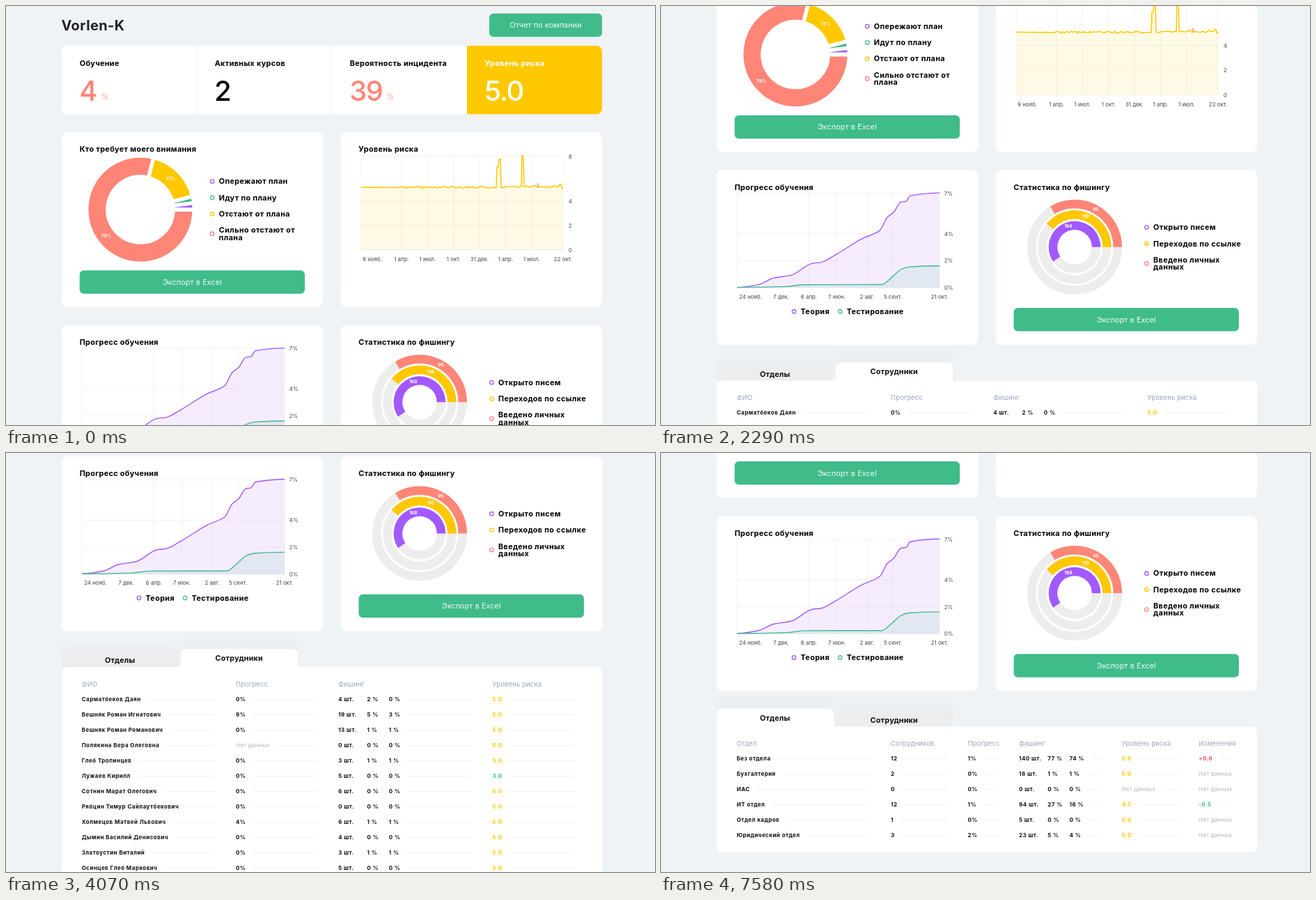
An HTML page that plays this animation: 932 by 601 pixels, repeating every 8 s.

```html
<!DOCTYPE html>
<html lang="ru">
<head>
<meta charset="utf-8">
<title>Отчет</title>
<style>
html, body { margin: 0; width: 100%; height: 100%; overflow: hidden; background: #eff3f6; }
svg { display: block; width: 932px; height: 601px; font-family: Inter, "Open Sans", sans-serif; }
.tab { filter: drop-shadow(0 -15px 3px rgba(110, 90, 70, .022)); }
</style>
</head>
<body>
<svg id="stage" viewBox="0 0 932 601"></svg>
<script>
const GREEN = '#40bb8a', YELLOW = '#ffc800', RED = '#ff8577', PURPLE = '#a259ff';
const GRID = 'rgba(40, 40, 80, .06)', MUTED = '#9ba5ba';
const stage = document.getElementById('stage');

function add(parent, tag, attrs = {}) {
  const el = document.createElementNS('http://www.w3.org/2000/svg', tag);
  for (const k in attrs) el.setAttribute(k, attrs[k]);
  parent.appendChild(el);
  return el;
}
const group = (parent) => add(parent, 'g');
const rect = (g, x, y, x2, y2, fill, r = 0) =>
  add(g, 'rect', { x, y, width: x2 - x, height: y2 - y, rx: r, fill });
const path = (g, d, fill, stroke = 'none', width = 1) =>
  add(g, 'path', { d, fill, stroke, 'stroke-width': width, 'stroke-linejoin': 'round' });
const line = (g, x, y, x2, y2, stroke = GRID, width = 1) => path(g, `M${x} ${y}L${x2} ${y2}`, 'none', stroke, width);

// y is the optical middle of the text
function text(g, str, x, y, size, { weight = 400, fill = '#000', anchor = 'start', spacing = 0 } = {}) {
  const el = add(g, 'text', {
    x, y: y + size * 0.35, 'font-size': size, 'font-weight': weight,
    fill, 'text-anchor': anchor, 'letter-spacing': spacing
  });
  el.textContent = str;
  return el;
}
const heading = (g, str, x, y, fill) => text(g, str, x, y, 10.9, { weight: 700, fill, spacing: 0.3 });
const small = (g, str, x, y, anchor = 'middle') => text(g, str, x, y, 7.9, { fill: '#444', anchor });
const badge = (g, str, x, y) => text(g, str, x, y, 6.6, { weight: 700, fill: '#fff', anchor: 'middle' });

function button(g, str, x, y, width) {
  rect(g, x, y, x + width, y + 33.5, GREEN, 6);
  text(g, str, x + width / 2, y + 16.9, 10.8, { fill: '#f1fbf6', anchor: 'middle', spacing: 0.1 });
}
function card(g, title, x, y) {
  rect(g, x, y, x + 375.2, y + 250.7, '#fff', 8);
  heading(g, title, x + 25.7, y + 24.3);
}
function legend(g, color, x, y, label) {
  const rows = label.split('\n');
  const mid = y + (rows.length - 1) * 5.2;
  add(g, 'circle', { cx: x, cy: mid, r: 2.7, fill: '#fff', stroke: color, 'stroke-width': 1.3 });
  rows.forEach((s, i) => text(g, s, x + 9.6, y + i * 10.4, 10.8, { weight: 700, spacing: 0.38 }));
}
const legendList = (g, x, y, items) =>
  items.forEach(([color, label], i) => legend(g, color, x, y + i * 23.3, label));

function polar(cx, cy, r, deg) {
  const a = deg * Math.PI / 180;
  return `${cx + r * Math.cos(a)} ${cy - r * Math.sin(a)}`;
}
// counter-clockwise arc, angles measured from the right
function arc(g, cx, cy, r, from, to, color, width) {
  path(g, `M${polar(cx, cy, r, from)}A${r} ${r} 0 ${to - from > 180 ? 1 : 0} 0 ${polar(cx, cy, r, to)}`, 'none', color, width);
}

// monotone cubic through [x, y] points
function smooth(pts) {
  const slope = (i) => (pts[i + 1][1] - pts[i][1]) / (pts[i + 1][0] - pts[i][0]);
  const tangent = (i) => {
    if (i === 0 || i === pts.length - 1) return 0;
    const a = slope(i - 1), b = slope(i);
    return a * b > 0 ? 2 * a * b / (a + b) : 0;
  };
  return pts.slice(1).reduce((d, [x, y], i) => {
    const [px, py] = pts[i], h = (x - px) / 3;
    return d + `C${px + h} ${py + h * tangent(i)} ${x - h} ${y - h * tangent(i + 1)} ${x} ${y}`;
  }, `M${pts[0]}`);
}
function random(seed) {
  return () => (seed = (seed * 16807) % 2147483647) / 2147483647;
}

function drawSummary(g) {
  text(g, 'Vorlen-K', 79.5, 27.5, 20, { weight: 700, fill: '#202124', spacing: 0.4 });
  button(g, 'Отчет по компании', 694, 10.7, 162);
  rect(g, 80, 57, 856, 155.3, '#fff', 8);
  path(g, 'M662 57H848a8 8 0 0 1 8 8V147.3a8 8 0 0 1 -8 8H662z', YELLOW);
  [
    ['Обучение', '4', RED, 142], ['Активных курсов', '2', '#000'],
    ['Вероятность инцидента', '39', RED, 552], ['Уровень риска', '5.0', '#fff']
  ].forEach(([title, value, color, unit], i) => {
    const x = 105.7 + i * 194;
    if (i === 1 || i === 2) line(g, x - 26.2, 57, x - 26.2, 155);
    heading(g, title, x, 81.7, i === 3 ? '#fff' : '#000');
    text(g, value, x - 0.5, 122.4, 39.8, { weight: 500, fill: color, spacing: -1.3 });
    if (unit) text(g, '%', unit, 130, 11, { weight: 300, fill: color, anchor: 'middle' });
  });
}

function drawAttention(g) {
  card(g, 'Кто требует моего внимания', 80, 181.2);
  const cuts = [0, 7, 14.2, 75.8, 360];
  [PURPLE, GREEN, YELLOW, RED].forEach((c, i) => arc(g, 193, 292, 62.2, cuts[i], cuts[i + 1] - 0.01, c, 24.8));
  cuts.forEach((a) => path(g, `M${polar(193, 292, 46, a)}L${polar(193, 292, 78, a)}`, 'none', '#fff', 5.6));
  badge(g, '17%', 236.5, 248);
  badge(g, '79%', 144, 330);
  legendList(g, 296.2, 251.6, [[PURPLE, 'Опережают план'], [GREEN, 'Идут по плану'],
    [YELLOW, 'Отстают от плана'], [RED, 'Сильно отстают от\nплана']]);
  button(g, 'Экспорт в Excel', 105.7, 379.2, 323.4);
}

function drawRisk(g) {
  card(g, 'Уровень риска', 480.6, 181.2);
  const rnd = random(77);
  const left = 510, right = 800, floor = 350;
  let level = 258, d = '';
  for (let x = left; x <= right; x++) {
    const swing = x < 556 ? 0.6 : x < 793 ? 2.6 : 9;
    if (x % 3 === 0) level = (x < 700 ? 260.2 : 259) + (rnd() - 0.5) * swing;
    const peak = x > 740 && x < 744 ? 214.5 : x > 707 && x < 711 ? 219.5 : x > 704 && x < 708 ? 231 : level;
    d += `${d ? 'L' : 'M'}${x} ${peak}`;
  }
  path(g, `${d}L${right} ${floor}L${left} ${floor}Z`, YELLOW).setAttribute('fill-opacity', 0.1);

  const months = ['1 апр.', '1 июл.', '1 окт.', '31 дек.', '1 апр.', '1 июл.'];
  months.forEach((s, i) => {
    const x = 568 + i * 37.35;
    line(g, x, 214.5, x, floor);
    small(g, s, x, 363.3);
  });
  small(g, '9 нояб.', 526, 363.3);
  small(g, '22 окт.', right, 363.3);
  [8, 4, 2, 0].forEach((n) => {
    const y = Math.max(215.8, floor - n * 17.6);
    line(g, left, y - 0.5, right, y - 0.5);
    small(g, n, 807.8, y + 0.4, 'start');
  });
  [left, right].forEach((x) => line(g, x, 214.5, x, floor));
  path(g, d, 'none', YELLOW, 1.5);
  line(g, 764, 254.5, 764, 259.5, RED, 1.6);
}

function drawProgress(g) {
  card(g, 'Прогресс обучения', 80, 457.9);
  const base = 626.6, left = 109, right = 400;
  [['24 нояб.', 128.5], ['7 дек.', 172.5], ['6 апр.', 212.5], ['7 июн.', 252.5], ['2 авг.', 296], ['5 сент.', 333], ['21 окт.', right]]
    .forEach(([s, x], i) => {
      small(g, s, x, 639.5);
      if (i > 1) line(g, x, 490.5, x, base);
    });
  line(g, left, 490.5, left, base);
  [7, 4, 2, 0].forEach((n) => {
    const y = base - n * 19.35;
    line(g, left, y, right, y);
    small(g, n + '%', 406.8, y + 0.3, 'start');
  });
  // key points: x and height above the axis
  const curve = (color, keys) => {
    const d = smooth(keys.map(([x, h]) => [x, base - h]));
    path(g, `${d}L${right} ${base}L${left} ${base}Z`, color).setAttribute('fill-opacity', 0.11);
    path(g, d, 'none', color, 1.4);
  };
  curve(PURPLE, [[left, 0.5], [140, 4.5], [162, 14], [187, 18], [217, 35], [230, 36.5], [252, 48],
    [288, 70], [314, 82], [325, 101], [334, 108], [344, 122.5], [352, 124], [358, 132], [right, 136]]);
  curve(GREEN, [[left, 0.5], [180, 1.7], [207, 4.4], [317, 4.6], [331, 14.5], [345, 26.5], [358, 30], [right, 31.4]]);
  legend(g, PURPLE, 191, 660.7, 'Теория');
  legend(g, GREEN, 257.2, 660.7, 'Тестирование');
}

function drawPhishing(g) {
  card(g, 'Статистика по фишингу', 480.6, 457.9);
  [[95, RED], [110, YELLOW], [168, PURPLE]].forEach(([n, color], i) => {
    const r = 61.8 - i * 15.4;
    add(g, 'circle', { cx: 594, cy: 568.3, r, fill: 'none', stroke: '#ededed', 'stroke-width': 12.5 });
    arc(g, 594, 568.3, r, 0, n * 1.273, color, 12.5);
    const [x, y] = polar(594, 568.3, r, n * 0.637).split(' ');
    badge(g, n, x, +y);
  });
  legendList(g, 697.4, 540, [[PURPLE, 'Открыто писем'], [YELLOW, 'Переходов по ссылке'], [RED, 'Введено личных\nданных']]);
  button(g, 'Экспорт в Excel', 506.5, 655.6, 323.4);
}

function drawTable(g, activeTab, bottom, cols, rows) {
  ['Отделы', 'Сотрудники'].forEach((s, i) => {
    const x = 80 + i * 171, on = i === activeTab, top = on ? 734 : 740.3;
    path(g, `M${x} 760V${top + 7}a7 7 0 0 1 7 -7h154a7 7 0 0 1 7 7V760z`, on ? '#fff' : '#ededee').setAttribute('class', 'tab');
    text(g, s, x + 83.8, on ? 747.2 : 750.4, 10.8, { weight: 700, fill: '#111', anchor: 'middle', spacing: 0.2 });
  });
  rect(g, 80, 759.9, 856, bottom, '#fff', 8);
  if (activeTab === 0) rect(g, 80, 755, 100, 775, '#fff');
  cols.forEach((c) => text(g, c.title, c.x, 784, 9.6, { fill: MUTED, spacing: 0.08 }));
  rows.forEach((row, i) => {
    const y = 805.9 + i * 22.02;
    row.forEach((cell, j) => {
      const { x, end } = cols[j];
      let right = x;
      [].concat(cell.s).forEach((s, k) => {
        const none = s === NONE, cx = x + k * 31.2 + (k ? 10.1 : 0);
        const style = none ? { fill: '#b4b4b8', spacing: 0.27 } : { weight: 700, fill: cell.fill || '#111', spacing: 0.46 };
        right = cx + text(g, s, cx, y, 8, style).getComputedTextLength() + 10;
      });
      if (right < end) line(g, right, y + 0.3, end, y + 0.3, '#f1f1f3');
    });
  });
}

const NONE = 'Нет данных';
const mails = (s) => {
  const [n, a, b] = s.split('/');
  return { s: [`${n} шт.`, `${a} %`, `${b} %`] };
};
const percent = (s) => ({ s: s === '-' ? NONE : s + '%' });
const level = (s) => ({ s: s === '-' ? NONE : s, fill: s === '3.0' ? GREEN : YELLOW });

// name, letters, progress and risk when not the usual ones
const people = `Сарматбеков Даян,4/2/0
Вешняк Роман Игнатович,19/5/3,9
Вешняк Роман Романович,13/1/1
Полякина Вера Олеговна,0/0/0,-
Глеб Тропинцев,3/1/1
Лужаев Кирилл,5/0/0,0,3.0
Сотнин Марат Олегович,6/0/0
Рябцин Тимур Сайлаутбекович,0/0/0
Холмецов Матвей Львович,6/1/1,4
Дымин Василий Денисович,4/0/0
Златоустин Виталий,3/1/1
Осинцев Глеб Маркович,5/0/0
Ветлин Олег Олегович,7/0/0,6
Ветлин Максим,5/0/0
Ветлина Маргарита Олеговна,6/1/1
Снежина Алла Олеговна,0/0/0,-
Снежин Глеб,7/0/0`.split('\n').map((r) => {
  const [name, sent, done = '0', risk = '5.0'] = r.split(',');
  return [{ s: name }, percent(done), mails(sent), level(risk)];
});

const departments = `Без отдела,12,1,140/77/74,5.6,+0.6
Бухгалтерия,2,0,18/1/1,5.0,-
ИАС,0,0,0/0/0,-,-
ИТ отдел,12,1,94/27/16,4.7,-0.5
Отдел кадров,1,0,5/0/0,5.0,-
Юридический отдел,3,2,23/5/4,5.0,-`.split('\n').map((r) => {
  const [name, size, done, sent, risk, diff] = r.split(',');
  const change = { s: diff === '-' ? NONE : diff, fill: diff[0] === '+' ? '#ff4b5c' : GREEN };
  return [{ s: name }, { s: size }, percent(done), mails(sent), level(risk), change];
});

const columns = (list) => list.map(([x, title, end]) => ({ x, title, end }));

const page = group(stage);
[drawSummary, drawAttention, drawRisk, drawProgress, drawPhishing].forEach((draw) => draw(group(page)));
const staff = group(page), units = group(page);
drawTable(staff, 1, 1300, columns([
  [108.7, 'ФИО', 300], [330, 'Прогресс', 448], [477.2, 'Фишинг', 669], [698.5, 'Уровень риска', 817]
]), people);
drawTable(units, 0, 940, columns([
  [108.7, 'Отдел', 300], [330, 'Сотрудников', 411], [440.5, 'Прогресс', 485], [514, 'Фишинг', 632],
  [661.5, 'Уровень риска', 743], [772, 'Изменения', 817]
]), departments);

const arrow = path(stage, 'M.6 .6V10.6L3 8.4L4.6 11.8L6.2 11.1L4.7 7.8H8.2Z', '#000', '#fff', 0.9);
const hand = path(stage,
  'M3 1.4Q4.4 0 4.9 1.7L5.7 4.8Q7 4 7.5 5Q8.8 4.4 9.2 5.5Q10.7 5.2 10.9 6.5Q11.2 9 10.2 11V13H5.2V12.2' +
  'Q2.6 10.4 1 8.3Q.6 6.8 2.2 7.2L3.7 8.3L2.6 2.6ZM6.4 9V11M7.8 9V11M9.2 8.8V10.8', '#fff', '#222', 0.9);

const LOOP = 8000, ENTER = 5220, SWITCH = 6400, GONE = 7580, GLIDE = 1040;
const lerp = (a, b, p) => a + (b - a) * p;
const easeOut = (p, n) => 1 - (1 - p) ** n;
const easeInOut = (p) => p * p * (3 - 2 * p);
const show = (el, on) => el.setAttribute('display', on ? 'inline' : 'none');

// evenly spaced moments, on the 10 ms grid
const burst = (from, to, n) =>
  Array.from({ length: n }, (_, i) => Math.floor(lerp(from, to, i / (n - 1)) / 10) * 10);
const wheel = [500, ...burst(800, 1590, 5), ...burst(1880, 2670, 5), ...burst(3000, 3860, 5), ...burst(4070, 4780, 5)];
// wheel steps taken and the offset reached
const stops = [[0, 0], [1, 3], [4, 84.4], [9, 222.5], [12, 302.7], [17, 452.8], [21, 560]];

function scrollAt(t) {
  if (t >= SWITCH) return 367.3; // the shorter table clamps the page
  const n = wheel.filter((w) => w <= t).length;
  const i = Math.max(1, stops.findIndex(([k]) => k >= n));
  const [a, from] = stops[i - 1], [b, to] = stops[i];
  return lerp(from, to, (n - a) / (b - a));
}

function cursorAt(t) {
  if (t < ENTER || t >= GONE) return null;
  const start = t < SWITCH ? ENTER : SWITCH;
  const p = (burst(start, start + GLIDE, 8).filter((m) => m <= t).length - 1) / 7;
  return t < SWITCH
    ? [lerp(803, 142, easeOut(p, 1.93)), lerp(268, 183, easeOut(p, 1.65))]
    : [lerp(142, 900, easeInOut(p)), lerp(183, 331, easeInOut(p))];
}

function render(t) {
  const cursor = cursorAt(t);
  const pointing = cursor && cursor[0] < 240 && t < SWITCH;
  page.setAttribute('transform', `translate(0 ${-scrollAt(t)})`);
  show(staff, t < SWITCH);
  show(units, t >= SWITCH);
  show(hand, pointing);
  show(arrow, cursor && !pointing);
  if (cursor) (pointing ? hand : arrow).setAttribute('transform', `translate(${cursor})`);
}

const start = performance.now();
function tick() {
  render((performance.now() - start) % LOOP);
  requestAnimationFrame(tick);
}
tick();
</script>
</body>
</html>
```
